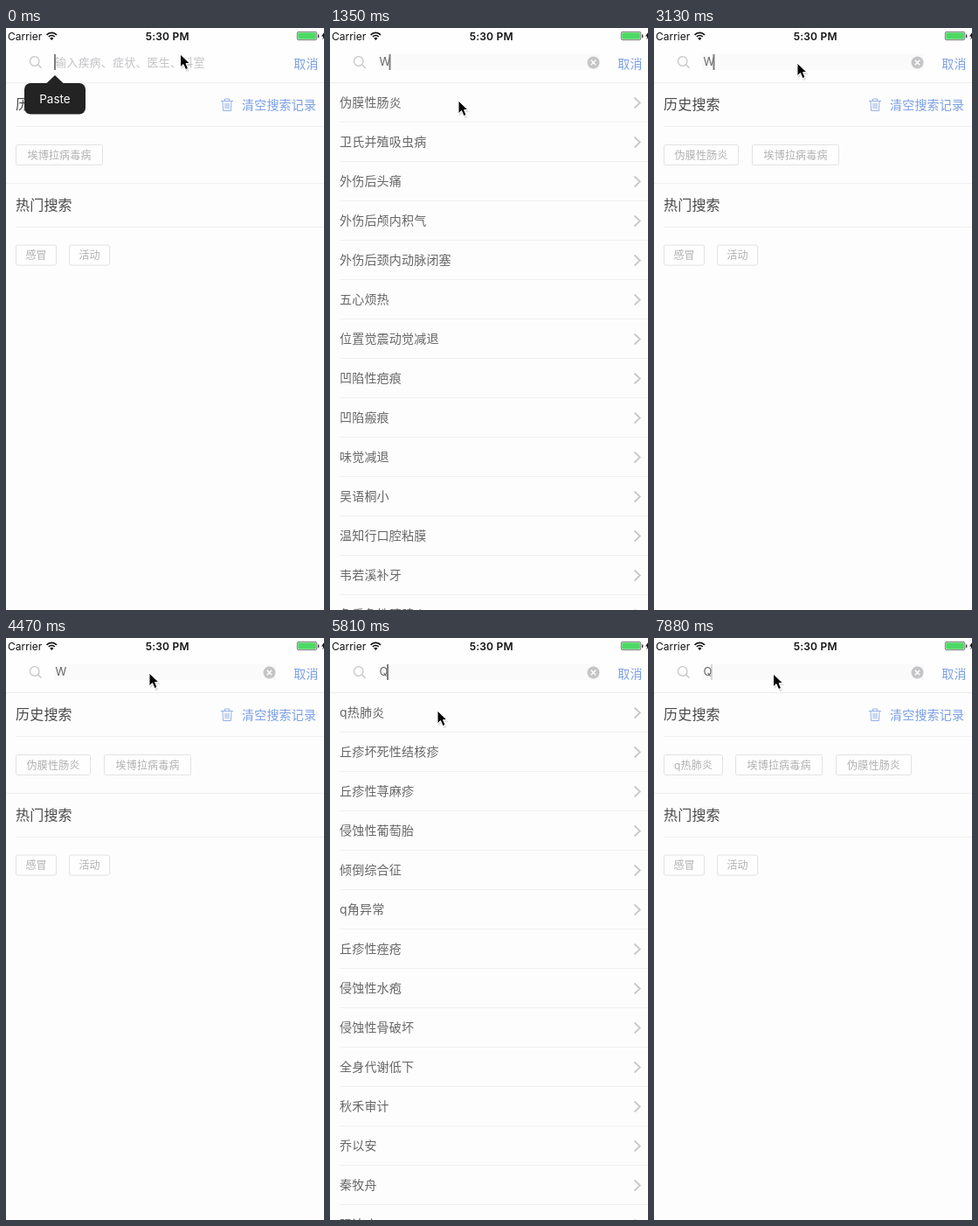
An HTML page that plays this animation: 364x665 px, repeating every 8000 ms.

```html
<!DOCTYPE html>
<html lang="zh-CN">
<head>
<meta charset="utf-8">
<style>
html, body { margin: 0; width: 100%; height: 100%; overflow: hidden; background: #fdfdfd; }
svg { display: block; width: 364px; height: 665px; font-family: Inter, "Noto Sans CJK SC", "Noto Sans CJK", sans-serif; }
.cjk { letter-spacing: .2px; }
</style>
</head>
<body>
<svg id="stage" viewBox="0 0 364 665"></svg>
<script>
const LOOP = 8000, TICK = 149;
const BLUE = '#7a9fe6', GREY = '#c5c5c8';

const text = (x, y, size, fill, str, extra = 'class="cjk"') =>
  `<text x="${x}" y="${y}" font-size="${size}" fill="${fill}" ${extra}>${str}</text>`;
const rect = (x, y, w, h, fill, extra = '') =>
  `<rect x="${x}" y="${y}" width="${w}" height="${h}" fill="${fill}" ${extra}/>`;
const line = (x, y, color = '#f0f0f0') => rect(x, y, 364 - x, 1, color);
const path = (d, stroke, width = 1, fill = 'none') =>
  `<path d="${d}" stroke="${stroke}" stroke-width="${width}" fill="${fill}"/>`;
const group = (id, body) => `<g id="${id}">${body}</g>`;

const tag = (x, y, w, str) =>
  rect(x + .5, y + .5, w - 1, 23, '#fefefe', 'rx="2" stroke="#e2e2e2"') +
  text(x + w / 2 + .1, y + 16.7, 12, '#b0b0b0', str, 'class="cjk" text-anchor="middle"');

const list = (id, rows) => group(id, rect(0, 63, 364, 602, '#fdfdfd') + rows.map((str, i) => {
  const y = 85.5 + 45 * i;
  return text(11, y + 4.5, 14, '#666', str) + line(11, y + 21.5) +
    path(`M348.5 ${y - 6}l6.3 6l-6.3 6`, '#c7c7cc', 1.8);
}).join(''));

const statusBar =
  text(2, 13.5, 12, '#111', 'Carrier', '') +
  path('M46.6 7.8a8 8 0 0 1 11.4 0M48.8 10a5 5 0 0 1 7 0', '#111', 1.7) +
  '<path d="M52.3 14l-2.1-2.2a3 3 0 0 1 4.2 0z" fill="#111"/>' +
  text(184.7, 13.5, 12, '#111', '5:30 PM', 'font-weight="600" text-anchor="middle" letter-spacing=".2"') +
  rect(333.3, 4.3, 22.5, 9.4, '#fff', 'rx="1.8" stroke="#222" stroke-width=".6"') +
  rect(334.2, 5.2, 20.7, 7.6, '#4cd964', 'rx="1"') +
  rect(357, 7.5, 1.3, 3.5, '#333') +
  '<path d="M364.5 4.5l-3.5 5h2l-.5 4 3-5z" fill="#111"/>';

const searchBar =
  rect(0, 0, 364, 62, '#fefefe') + line(0, 62, '#ededed') + statusBar +
  group('field', rect(55, 30, 254, 18, '#fafafa')) +
  '<circle cx="32.7" cy="38" r="5.3" fill="none" stroke="#c4c4c4" stroke-width="1.2"/>' +
  path('M36.5 41.8l4 4', '#c4c4c4', 1.3) +
  text(329.3, 46, 14, BLUE, '取消') +
  group('hint', text(56, 43.6, 13, '#c3c3c7', '输入疾病、症状、医生、科室')) +
  text(56.4, 43.4, 13, '#666', '', 'id="query"') +
  group('clear', `<circle cx="301.5" cy="39.5" r="7" fill="${GREY}"/>` +
    path('M298.8 36.8l5.4 5.4m0-5.4l-5.4 5.4', '#fff', 1.4)) +
  rect(0, 30, 2, 18, '#808080', 'id="caret"');

const home =
  text(11, 93.4, 16, '#4a4a4a', '历史搜索') +
  path('M246 83.5h14M250.5 83v-2h5v2M248 84l.6 10.5h8.8l.6-10.5M251 86v6.5M253 86v6.5M255 86v6.5', BLUE, .8) +
  text(270, 93.3, 14, BLUE, '清空搜索记录') +
  line(11, 112) + line(0, 177) + line(11, 227) +
  group('past0', tag(11, 133, 100, '埃博拉病毒病')) +
  group('past1', tag(11, 133, 86, '伪膜性肠炎') + tag(112, 133, 100, '埃博拉病毒病')) +
  group('past2', tag(11, 133, 68, 'q热肺炎') + tag(93, 133, 100, '埃博拉病毒病') + tag(208, 133, 87, '伪膜性肠炎')) +
  text(11, 207.8, 16, '#4a4a4a', '热门搜索') +
  tag(11, 247.5, 47, '感冒') + tag(72, 247.5, 47, '活动');

const popup = group('popup',
  rect(21, 63, 70, 35.5, '#232323', 'rx="7"') +
  '<path d="M46 63.5L56 54l10 9.5z" fill="#232323"/>' +
  text(56, 86, 13.5, '#fff', 'Paste', 'text-anchor="middle"'));

const pointer = group('pointer',
  '<path d="M1 1.5v16l3.7-3.3 2.700 6 3-1.4-2.7-5.6h5z" fill="#000" opacity=".12"/>' +
  '<path d="M0 0v14.8l3.5-3.2 2.6 6 2.9-1.3-2.5-5.7h4.5z" fill="#000" stroke="#fff"/>');

const $ = id => document.getElementById(id);
$('stage').innerHTML = home +
  list('listW', ['伪膜性肠炎', '卫氏并殖吸虫病', '外伤后头痛', '外伤后颅内积气', '外伤后颈内动脉闭塞',
    '五心烦热', '位置觉震动觉减退', '凹陷性疤痕', '凹陷瘢痕', '味觉减退',
    '吴语桐小', '温知行口腔粘膜', '韦若溪补牙', '危重急性胰腺炎']) +
  list('listQ', ['q热肺炎', '丘疹坏死性结核疹', '丘疹性荨麻疹', '侵蚀性葡萄胎', '倾倒综合征',
    'q角异常', '丘疹性痤疮', '侵蚀性水疱', '侵蚀性骨破坏', '全身代谢低下',
    '秋禾审计', '乔以安', '秦牧舟', '强迫症']) +
  searchBar + popup + pointer;

// Pointer stops: ms, x, y
const stops = [[450, 199.5, 30], [1200, 147, 83], [1800, 147, 83], [1950, 149.5, 68], [2530, 164, 40],
  [5220, 164, 40], [5800, 123, 83], [6260, 123, 83], [6400, 132.5, 58], [6990, 136.5, 41]];

// Moves between stops in whole ticks, as a screen recording does
function pointerAt(t) {
  const i = stops.findIndex(s => s[0] > t);
  if (i < 1) return (i ? stops[stops.length - 1] : stops[0]).slice(1);
  const [t0, x0, y0] = stops[i - 1], [t1, x1, y1] = stops[i];
  const steps = Math.round((t1 - t0) / TICK);
  const k = Math.floor((t - t0) / (t1 - t0) * steps) / steps;
  return [x0 + (x1 - x0) * k, y0 + (y1 - y0) * k];
}

// Caret opacity changes: ms, opacity
const blinks = [[0, 1], [1500, 0], [3130, 1], [3420, .45], [3570, 0], [3870, 1], [4320, .45], [4470, 0],
  [4770, 1], [5950, 0], [7590, 1], [7880, .3]];

const show = (id, on) => { $(id).style.display = on ? '' : 'none'; };

function draw(t) {
  const within = (from, to) => t >= from && t < to;
  const query = t < 300 || within(4920, 5070) ? '' : t < 4920 ? 'W' : 'Q';
  const focused = t < 1500 || within(3130, 5950) || t >= 7590;
  show('popup', t < 150);
  show('hint', !query);
  show('clear', focused && query);
  show('field', focused && query);
  show('listW', within(450, 1500));
  show('listQ', within(5070, 5950));
  show('past0', t < 1500);
  show('past1', within(1500, 5950));
  show('past2', t >= 5950);
  $('query').textContent = query;
  $('caret').setAttribute('x', { '': 55, W: 67.5, Q: 65 }[query]);
  $('caret').setAttribute('opacity', blinks.filter(b => b[0] <= t).pop()[1]);
  $('pointer').setAttribute('transform', `translate(${pointerAt(t)})`);
}

const start = performance.now();
function frame() {
  draw(Math.max(0, performance.now() - start) % LOOP);
  requestAnimationFrame(frame);
}
frame();
</script>
</body>
</html>
```
